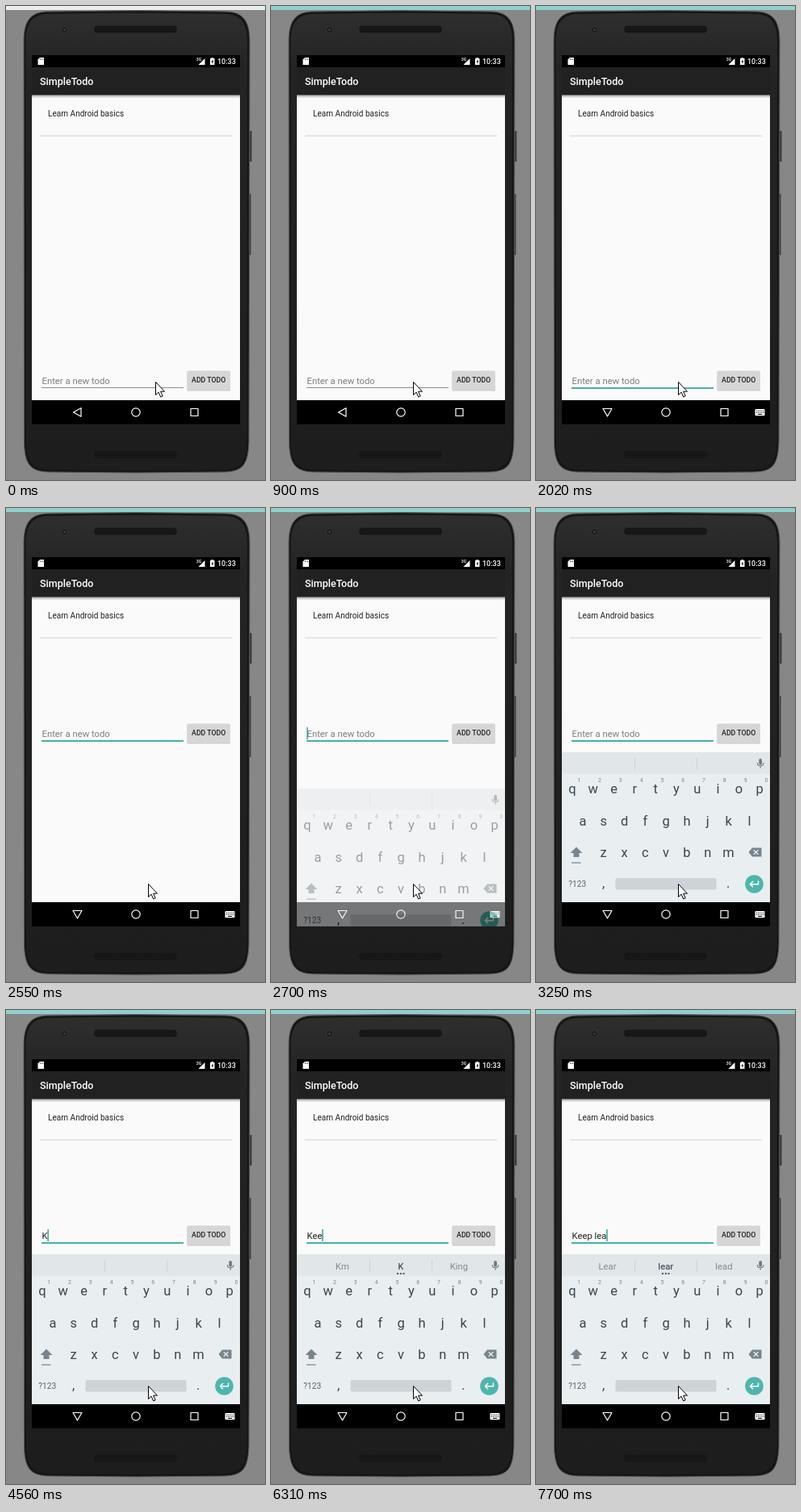
These frames come from a looping animation (321x588 px, 8 s). An HTML page:

```html
<!DOCTYPE html>
<html lang="en">
<head>
<meta charset="utf-8">
<title>Todo app on a phone</title>
<style>
  html, body { margin: 0; width: 100%; height: 100%; overflow: hidden; background: #878787; }
  svg { display: block; width: 100vw; height: 100vh; font-family: Roboto, "Noto Sans", sans-serif; }
  .mid { text-anchor: middle; }
  .medium { font-weight: 500; }
</style>
</head>
<body>
<svg viewBox="0 0 321 588" preserveAspectRatio="none">
  <defs>
    <linearGradient id="body" x1="0" y1="0" x2="0" y2="1">
      <stop offset="0" stop-color="#2e2e2e"/>
      <stop offset=".12" stop-color="#242424"/>
      <stop offset="1" stop-color="#1d1d1d"/>
    </linearGradient>
    <linearGradient id="shade" x1="0" y1="0" x2="0" y2="1">
      <stop offset="0" stop-opacity=".32"/>
      <stop offset="1" stop-opacity="0"/>
    </linearGradient>
    <pattern id="mesh" width="2" height="2" patternUnits="userSpaceOnUse">
      <rect width="2" height="2" fill="#101010"/>
      <rect width="1" height="1" fill="#2b2b2b"/>
    </pattern>
    <clipPath id="screen"><rect x="32" y="61" width="258" height="458"/></clipPath>
  </defs>

  <rect width="321" height="588" fill="#878787"/>
  <rect id="topBar" width="321" height="5"/>

  <!-- phone -->
  <path d="M302 155h2.5v38h-2.5zM301.500 233h2v76h-2z" fill="#3c3c3c"/>
  <path id="shell" d="M22 44C22 20 29 8 50 7Q161 4.500 274 7C295 8 302 20 302 44L301 541C300 568 294 577 272 578Q161 580 51 578C30 577 23 568 22.500 541Z"
        fill="#161616" stroke="#565656"/>
  <path d="M24.500 45C24.500 23 31 11 51 10Q161 7.500 273 10C293 11 299 23 299 45L298.500 540C298 564 291 574 271 575Q161 577 52 575C32 574 25 564 25 540Z"
        fill="url(#body)"/>
  <circle cx="72.500" cy="29.500" r="4" fill="#1b1b1b" stroke="#3b3b3b" stroke-width=".8"/>
  <circle cx="72.500" cy="29.500" r="1.500" fill="#3a414a"/>
  <g fill="url(#mesh)" stroke="#151515" stroke-width=".8">
    <rect x="109.500" y="25" width="102" height="8" rx="3.500"/>
    <rect x="109.500" y="552" width="102" height="8" rx="3.500"/>
  </g>

  <g clip-path="url(#screen)">
    <rect x="32" y="61" width="258" height="458"/>
    <!-- status bar -->
    <g fill="#fff">
      <path d="M42 64h5v9h-7.500v-6.500z"/>
      <path d="M42.300 65.300v1.700M44 65.300v1.700M45.700 65.300v1.700" stroke="#000" stroke-width=".6"/>
      <text x="235.800" y="68" font-size="5.200" class="medium">3G</text>
      <path d="M246.500 65v8h-8z"/>
      <path d="M253 65h1.500v-1h2.500v1h1.500v8h-5.500z"/>
      <path d="M256.500 66l-2 3.500h1.200l-.4 2.500 2-3.500h-1.200z" fill="#000"/>
      <text x="262" y="72.300" font-size="9" class="medium">10:33</text>
    </g>
    <!-- title and list -->
    <rect x="32" y="76" width="258" height="34.500" fill="#212121"/>
    <text x="42" y="98.200" font-size="12.550" class="medium" fill="#fff">SimpleTodo</text>
    <rect x="32" y="110.500" width="258" height="378.500" fill="#fafafa"/>
    <rect x="32" y="110.500" width="258" height="4" fill="url(#shade)"/>
    <text x="52" y="136.500" font-size="10.040" fill="#212121">Learn Android basics</text>
    <rect x="42" y="160.500" width="238" height="1.200" fill="#dadada"/>

    <!-- input row -->
    <g id="row">
      <text id="entry" x="44.500" y="469" font-size="11.300"></text>
      <rect id="compose" x="44.500" y="469.500" height="1" fill="#333"/>
      <rect id="line" x="44" width="176"/>
      <rect id="caret" y="457" width="1.300" height="15" fill="#129a8d"/>
      <rect x="224.500" y="453.500" width="53.500" height="24" rx="1.500" opacity=".2"/>
      <rect x="224.500" y="452.500" width="53.500" height="24" rx="1.500" fill="#d6d6d6"/>
      <text x="251.200" y="467.300" font-size="8.780" class="medium mid" fill="#212121">ADD TODO</text>
    </g>

    <!-- navigation -->
    <rect x="32" y="489" width="258" height="30"/>
    <g fill="none" stroke="#fff" stroke-width="1.200" stroke-linejoin="round">
      <path id="back"/>
      <circle cx="161" cy="504" r="5.200"/>
      <rect x="229" y="499.500" width="9" height="9"/>
    </g>
    <g id="imeIcon">
      <rect x="271.500" y="500" width="12" height="8.300" rx="1" fill="#fff"/>
      <path d="M273 502.200h9.500M273 504.300h9.500" stroke="#000" stroke-dasharray="1.100 1"/>
      <path d="M275 506.500h5.200" stroke="#000"/>
    </g>

    <!-- keyboard -->
    <g id="board">
      <rect x="32" y="303" width="258" height="186" fill="#e9eef1"/>
      <rect x="32" y="303" width="258" height="26.500" fill="#e1e6e9"/>
      <path d="M122.500 309v15.500M199.500 309v15.500" stroke="#cdd3d6"/>
      <g font-size="11.300" class="mid">
        <text id="left" x="88.500" y="321.500" fill="#7f8b91"></text>
        <text id="best" x="160.800" y="321.500" fill="#4b5960" font-weight="500"></text>
        <text id="right" x="233" y="321.500" fill="#7f8b91"></text>
      </g>
      <path id="dots" d="M156 326h2v2h-2zM159.800 326h2v2h-2zM163.500 326h2v2h-2z" fill="#4b5960"/>
      <rect x="276.300" y="311" width="3.700" height="7.600" rx="1.850" fill="#6f7b81"/>
      <path d="M274.300 316c0 5 7.700 5 7.700 0M278.150 319.800v3" fill="none" stroke="#6f7b81" stroke-width="1.100"/>
      <g id="keys" class="mid" fill="#37474f"></g>
      <path d="M50 420.500l7.500 7.500h-4v5h-7v-5h-4zM44 439.500h11.500v1.300h-11.500z" fill="#78868c"/>
      <path d="M263.500 427l4.500-5.500h11.500v11h-11.500z" fill="#78868c"/>
      <path d="M269.800 424.200l5.600 5.600m0-5.600l-5.600 5.600" stroke="#e9eef1" stroke-width="1.300"/>
      <rect x="98.500" y="459" width="125" height="14.500" rx="2" fill="#cdd3d6"/>
      <circle cx="270.500" cy="466.500" r="11.300" fill="#4db6ac"/>
      <path d="M275.500 462.500v4.200h-10m3.500-3.600l-3.600 3.600 3.600 3.600" fill="none" stroke="#fff" stroke-width="1.400"/>
    </g>
  </g>

  <path id="pointer" d="M.5.500v16l3.600-3.400 2.600 5.900 2.500-1.100-2.600-5.700h4.900z" fill="#fff" stroke="#000" stroke-linejoin="round"/>
</svg>

<script>
const LOOP = 8000;
const $ = id => document.getElementById(id);
const set = (id, attrs) => {
  for (const name in attrs) $(id).setAttribute(name, attrs[name]);
};
const show = (id, on) => set(id, { visibility: on ? "visible" : "hidden" });

// Latest value of a list of [start, value] steps
const at = (t, steps) => steps.reduce((value, [start, next]) => t >= start ? next : value, null);
const within = (t, spans) => spans.some(([from, to]) => t >= from && t < to);

function addKey(label, x, y, size, fill) {
  const key = document.createElementNS("http://www.w3.org/2000/svg", "text");
  key.textContent = label;
  for (const [name, value] of Object.entries({ x, y, "font-size": size })) key.setAttribute(name, value);
  if (fill) key.setAttribute("fill", fill);
  $("keys").append(key);
}

const PITCH = 25.8;
[["qwertyuiop", 45, 354], ["asdfghjkl", 58, 393.5], ["zxcvbnm", 83.7, 433]].forEach(([letters, x, y]) =>
  [...letters].forEach((letter, i) => addKey(letter, x + i * PITCH, y, 16.5)));
[..."1234567890"].forEach((digit, i) => addKey(digit, 53.2 + i * PITCH, 340, 7, "#78868c"));
addKey("?123", 51.2, 470, 10.2, "#55646b");
addKey(",", 83.7, 471, 16.5);
addKey(".", 238.3, 471, 16.5);

const TYPED = [[0, ""], [4560, "K"], [5650, "Ke"], [6310, "Kee"], [6730, "Keep"], [7260, "Keep le"], [7700, "Keep lea"]];
const WORDS = [
  [0, ["", "", ""]],
  [5250, ["Km", "K", "King"]],
  [7260, ["Lear", "le", "lead"]],
  [7700, ["Lear", "lear", "lead"]]
];
const CARET = [[1590, 2020], [2700, 2950], [3540, 3970], [4560, LOOP]];
// How far the keyboard has slid and faded in
const ENTER = [[0, 0], [2700, 0.5], [2950, 0.72], [3250, 1]];
const SLIDE = 90;

function widthOf(text) {
  $("entry").textContent = text;
  return text ? $("entry").getComputedTextLength() : 0;
}

function drawEntry(t) {
  const typed = at(t, TYPED);
  const focused = t >= 1310;
  set("row", { transform: `translate(0 ${t >= 2550 ? -185 : 0})` });
  set("line", focused
    ? { y: 473, height: 2, fill: "#45b1a6" }
    : { y: 473, height: 1, fill: "#8c8c8c" });

  const composeFirst = within(t, [[5250, 6310]]);
  const composeLast = within(t, [[7260, 7700]]);
  const from = composeLast ? widthOf("Keep l") - widthOf("l") : 0;
  const to = composeFirst ? widthOf("K") : widthOf(typed);
  set("compose", { x: 44.5 + from, width: Math.max(0, to - from) });
  show("compose", composeFirst || composeLast);

  set("caret", { x: 44.4 + widthOf(typed) });
  show("caret", within(t, CARET));
  $("entry").textContent = typed || "Enter a new todo";
  set("entry", { fill: typed ? "#212121" : "#7d7d7d" });
}

function drawBoard(t) {
  const shown = at(t, ENTER);
  set("board", { opacity: shown, transform: `translate(0 ${SLIDE * (1 - shown)})` });
  show("board", shown > 0);
  const words = at(t, WORDS);
  ["left", "best", "right"].forEach((id, i) => { $(id).textContent = words[i]; });
  show("dots", words[1] !== "");
}

function draw(t) {
  set("topBar", { fill: t < 900 ? "#e9edec" : "#8fd0cd" });
  set("pointer", { transform: `translate(${t < 150 ? 185 : 176} 466)` });
  const keyboardOpen = t >= 1740;
  set("back", { d: keyboardOpen ? "M83 499.500h11l-5.500 9.500z" : "M83.500 504l9.500-5.300v10.600z" });
  show("imeIcon", keyboardOpen);
  drawEntry(t);
  drawBoard(t);
}

const start = performance.now();
function tick() {
  draw((performance.now() - start) % LOOP);
  requestAnimationFrame(tick);
}
tick();
</script>
</body>
</html>
```
